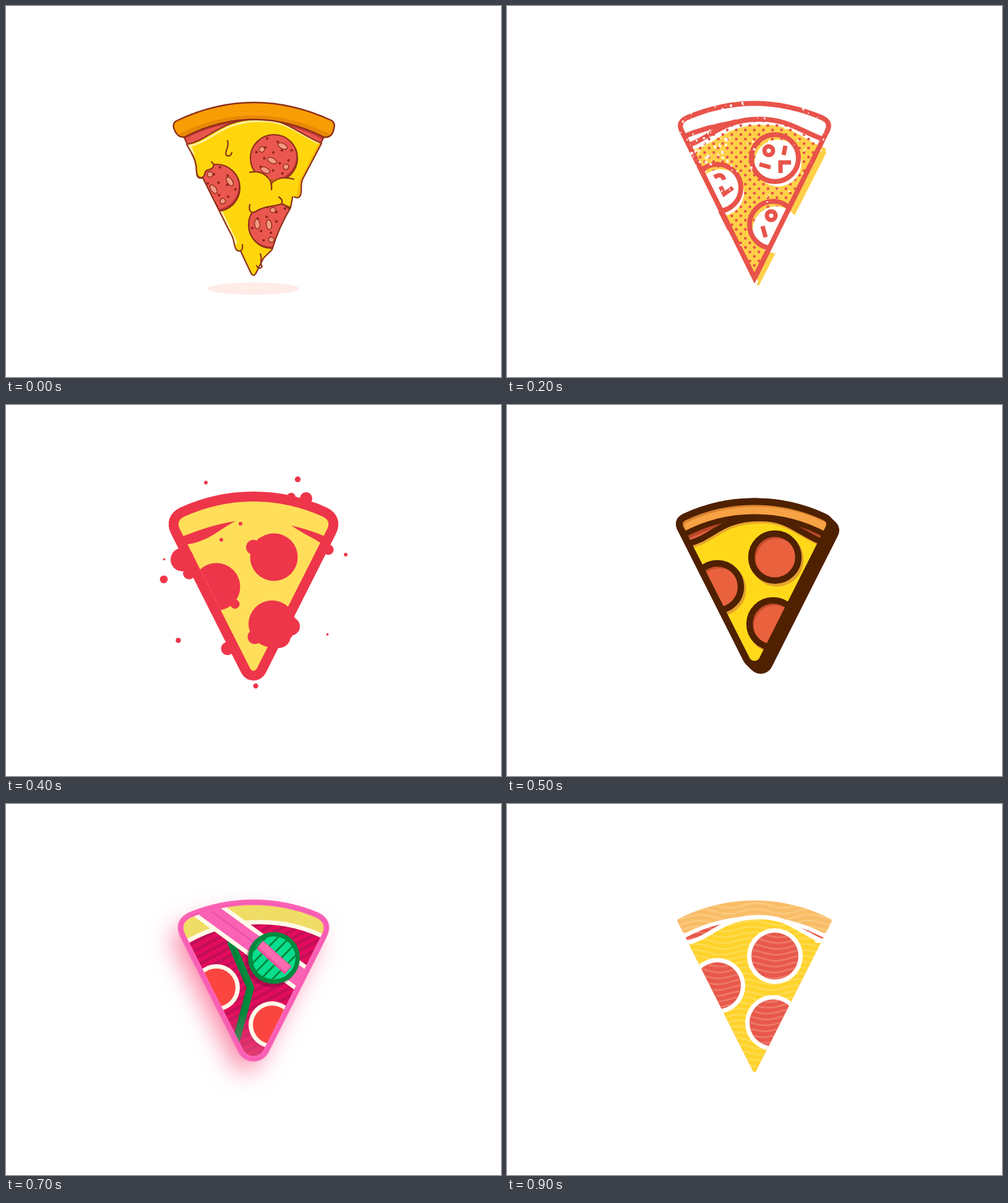
These frames come from a looping animation (800 px wide and 600 px high, 1 s). An HTML page with a canvas:

```html
<!DOCTYPE html>
<html lang="en">
<head>
<meta charset="utf-8">
<title>Pizza slices</title>
<style>
html, body { margin: 0; width: 100%; height: 100%; overflow: hidden; background: #fff; }
canvas { display: block; }
</style>
</head>
<body>
<canvas id="stage" width="800" height="600"></canvas>
<script>
const ctx = document.getElementById('stage').getContext('2d');
const TAU = Math.PI * 2;
const path = d => new Path2D(d);
const fill = (p, color) => { ctx.fillStyle = color; ctx.fill(p); };
const line = (p, color, width) => { ctx.strokeStyle = color; ctx.lineWidth = width; ctx.stroke(p); };

function oval(x, y, rx, ry, turn = 0) {
  const p = new Path2D();
  p.ellipse(x, y, rx, ry, turn, 0, TAU);
  return p;
}
const circle = (x, y, r) => oval(x, y, r, r);
const dot = (x, y, r, color) => fill(circle(x, y, r), color);

function within(p, draw) {
  ctx.save();
  ctx.clip(p);
  draw();
  ctx.restore();
}

function shifted(x, y, draw) {
  ctx.save();
  ctx.translate(x, y);
  draw();
  ctx.restore();
}

function seeded(seed) {
  return () => {
    seed = (seed * 16807) % 2147483647;
    return seed / 2147483647;
  };
}

// Shared slice geometry: a sector whose top arc is centred on HUB.
const HUB = 424, R = 268, SPREAD = Math.atan2(126, 237);

function wedge(corner, tipRadius) {
  const a = SPREAD - corner / R;
  const cx = 126 - 0.45 * corner, cy = 187 + 0.893 * corner;
  const p = new Path2D();
  p.moveTo(400 - cx, cy);
  p.quadraticCurveTo(274, 187, 400 - R * Math.sin(a), HUB - R * Math.cos(a));
  p.arc(400, HUB, R, -Math.PI / 2 - a, -Math.PI / 2 + a);
  p.quadraticCurveTo(526, 187, 400 + cx, cy);
  p.arcTo(400, 437, 400 - cx, cy, tipRadius);
  p.closePath();
  return p;
}
const discs = [[433, 246], [340, 294], [430, 354]];
const topCurve = 'M292 224C330 217 345 183 408 183C455 183 465 203 510 222';
const cheeseTop = path(topCurve);
const cheese = path(topCurve + 'L400 437Z');
const crustLow = path('M285 210A242 242 0 0 1 515 210');
const crust = path(`M280 184A268 268 0 0 1 520 184Q527 187 524 193L518 205Q515 210 510 208
  A242 242 0 0 0 290 208Q285 210 282 205L276 193Q273 187 280 184Z`);
const sharp = wedge(0, 0);

function specks(count, seed, color, place, size) {
  const rnd = seeded(seed);
  ctx.fillStyle = color;
  for (let i = 0; i < count; i++) {
    const [x, y] = place(rnd);
    const s = 0.6 + rnd() ** 3 * size;
    ctx.fillRect(x, y, s, s * (0.6 + rnd() * 0.8));
  }
}
const box = (x, y, w, h) => rnd => [x + rnd() * w, y + rnd() * h];

function salami(x, y, ink, turn) {
  const disc = circle(x, y, 38);
  fill(disc, '#bf3534');
  within(disc, () => dot(x - 2, y - 3, 38, '#ea574e'));
  for (let i = 1; i < 15; i++) {
    const r = 9 * Math.sqrt(i);
    dot(x + r * Math.cos(i * 2.4 + turn), y + r * Math.sin(i * 2.4 + turn), 2.1, '#8f2520');
  }
  for (let i = 0; i < 5; i++) {
    const a = turn + i * 1.57, r = i < 4 ? 24 : 5;
    const round = i % 2;
    const o = oval(x + r * Math.cos(a), y + r * Math.sin(a), round ? 4.5 : 8, 4.3, a + 1.4);
    fill(o, '#f49a84');
    line(o, ink, 1.4);
  }
  line(disc, ink, 2.2);
}

function melted() {
  const ink = '#8c2f1a', gold = '#ffd60c';
  const outline = d => line(path(d), ink, 2.2);
  fill(oval(400, 457, 74, 10), '#ffece7');

  const sauce = path('M286 208Q400 150 516 208L508 223L400 240L294 226Z');
  fill(sauce, '#e8564d');
  within(sauce, () => line(crustLow, '#c23b39', 13));
  line(sauce, ink, 2.2);

  const body = path(topCurve + `L480 279C475 288 479 298 476 306C473 312 466 311 464 305L460 326
    Q440 360 430 394L416 408L405 430Q400 441 395 430L379 396C371 398 370 390 368 381
    C367 372 362 367 358 358L318 278C311 280 308 276 308 268C308 255 305 248 300 238Z`);
  fill(body, gold);
  within(body, () => {
    shifted(3, 3, () => line(cheeseTop, '#fff0a0', 3));
    line(path('M296 226L312 270M345 330L370 382'), '#fff0a0', 7);
    line(path('M512 220L478 285L474 310'), '#f9b90c', 9);
    discs.forEach(([x, y], i) => salami(x, y, ink, 2.2 + i * 0.5));
  });
  line(body, ink, 2.2);

  const drip = 'C309 280 319 280 321 272C322 262 331 267 335 260Q337 256 332 252';
  fill(path('M302 242L308 268' + drip + 'L314 240Z'), gold);
  outline('M300 238C305 248 308 255 308 268' + drip);
  fill(path('M394 269C420 266 429 280 429 284Q440 274 466 280L466 308L425 308L396 290Z'), gold);
  outline('M394 269C414 265 432 278 429 297M428 288Q440 273 465 280');
  const fold = 'M394 321C391 335 399 336 406 331C420 322 438 324 445 320Q449 314 441 309';
  fill(path(fold + 'L410 306Z'), gold);
  outline(fold + 'M445 320L460 326');
  outline('M358 218C362 228 351 237 357 242Q363 244 365 237');
  outline('M411 401C415 410 409 416 414 421Q410 428 405 420M379 396Q383 394 382 386');

  const rim = path(`M277 185Q400 127 526 185Q533 190 530 198Q527 214 514 212
    Q400 155 288 212Q276 213 271 197Q269 188 277 185Z`);
  fill(rim, '#f89d04');
  within(rim, () => line(path('M282 209Q400 151 520 209'), '#e98805', 6));
  line(rim, ink, 2.4);
}

function stamped() {
  const red = '#e8534a';
  shifted(6, 9, () => {
    fill(cheese, '#ffd047');
    line(path('M508 228L400 441'), '#ffd047', 4);
  });
  within(cheese, () => {
    for (let j = 0; j < 38; j++) {
      for (let i = 0; i < 18; i++) dot(283 + i * 14.6 + (j % 2) * 7.3, 186 + j * 7.3, 2.3, red);
    }
  });
  discs.forEach(([x, y]) => dot(x + 5, y + 8, 38, '#fff'));

  ctx.lineCap = 'butt';
  ctx.lineJoin = 'miter';
  line(path(`M400 440L282 201Q276 188 290 181Q400 134 510 181Q524 188 518 201Z
    M286 211C320 196 345 194 371 187`), red, 8);
  line(path('M292 226C330 212 350 183 408 183C455 183 475 203 512 216'), red, 8);
  within(sharp, () => discs.forEach(([x, y]) => line(circle(x, y, 38), red, 8)));
  line(path('M424 391L400 440M345 331L360 361'), red, 8);
  line(circle(423, 234, 7), red, 7);
  line(circle(427, 339, 7), red, 7);
  line(path(`M450 226L447 241M408 256L426 261M442 270L442 253L459 253
    M335 277Q347 269 351 281M345 292L351 304L365 294M413 356L418 374`), red, 7);
  specks(260, 17, '#fff', r => [280 + r() * 240, 154 + r() * r() * 250], 3.2);
  specks(70, 5, '#fff', box(290, 210, 75, 60), 4);
}

function printed() {
  const slate = '#4a5961';
  const rnd = seeded(41);
  const bump = (x, y) => dot(x, y, 28 + rnd() * 9, slate);
  fill(sharp, slate);
  for (let t = 0; t <= 1; t += 0.045) {
    const a = SPREAD * (2 * t - 1);
    bump(400 + R * Math.sin(a), HUB - R * Math.cos(a));
    bump(274 + 126 * t, 187 + 250 * t);
    bump(526 - 126 * t, 187 + 250 * t);
  }
  specks(1300, 23, '#d5d9da', box(250, 130, 300, 335), 1.6);
  specks(650, 31, '#f2f3f3', box(375, 185, 145, 110), 1.9);
  specks(1000, 9, '#d2d2d4', r => {
    const a = r() * TAU, d = 235 * Math.sqrt(r());
    return [400 + d * Math.cos(a), 281 + d * Math.sin(a)];
  }, 2.4);
  specks(70, 12, '#c6c8ca', box(402, 68, 34, 55), 2.4);

  line(path(`M311 172Q405 142 513 181Q527 186 522 198L434 373M286 182Q274 186 281 197L355 353
    M368 376L374 387M382 404L396 430Q400 436 406 428L424 392M432 316A38 38 0 0 0 420 391
    M457 214A38 38 0 1 0 412 277M466 226A38 38 0 0 1 434 284
    M320 262Q330 256 345 256M352 258A38 38 0 0 1 362 324
    M298 221C330 212 350 183 408 183C455 183 470 202 504 210`), '#fff', 11);
  line(path('M292 210L342 193'), '#fff', 9);
  specks(45, 77, slate, box(290, 155, 220, 80), 1.8);
}

function splashed() {
  const red = '#ee364a';
  const inner = wedge(16, 6);
  line(inner, red, 32);
  fill(inner, '#ffde5a');
  fill(path('M284 213C310 203 340 192 371 188C345 200 328 222 288 226Z'), red);
  fill(path('M461 195C480 199 505 207 518 214L510 224C495 214 480 208 461 195Z'), red);
  within(sharp, () => dot(340, 294, 38.5, red));
  dot(433, 246, 38.5, red);
  dot(430, 354, 38, red);
  const blobs = [[285, 250, 19], [441, 374, 19], [460, 358, 15], [400, 230, 12], [402, 375, 11.5],
    [358, 394, 10.5], [485, 151, 10], [296, 272, 10], [521, 234, 8.5], [370, 322, 7.5], [461, 149, 7], [255, 282, 6.3]];
  blobs.forEach(([x, y, r]) => dot(x, y, r, red));
  // Fine droplets thrown out around the slice
  for (let i = 0; i < 7; i++) {
    const a = -1.15 + i * 0.9, d = 160 + 15 * Math.cos(i * 2);
    dot(400 + d * Math.cos(a), 280 + d * Math.sin(a), 3.2 + 1.5 * Math.cos(i * 1.8), red);
  }
  for (let i = 0; i < 3; i++) dot(348 + i * 31, 218 - 26 * (i % 2), 3, red);
}

function bold(depth) {
  const ink = '#4f2100';
  const slice = wedge(15, 14.5);
  for (let i = depth; i >= 0; i--) {
    shifted(i, i, () => { fill(slice, ink); line(slice, ink, 11); });
  }
  within(slice, () => {
    fill(slice, '#e4623f');
    fill(crust, '#f7a244');
    shifted(3, 3, () => line(slice, '#da8530', 11));
    shifted(2, 4, () => line(crustLow, '#b8472b', 10));
    fill(cheese, '#ffd919');
    within(cheese, () => {
      shifted(2, 3, () => line(cheeseTop, '#e9a62b', 11));
      discs.forEach(([x, y]) => line(circle(x + 3, y + 4, 38), '#e5a12d', 11));
    });
    discs.forEach(([x, y]) => {
      const disc = circle(x, y, 38);
      fill(disc, '#c24b2c');
      within(disc, () => dot(x + 3, y + 4, 34, '#e9623d'));
      line(disc, ink, 10.5);
    });
    line(crustLow, ink, 9);
    line(cheeseTop, ink, 10);
  });
  line(slice, ink, 11);
}

function hover() {
  const board = wedge(27, 23);
  const pink = '#fb62b6', cream = '#fffbea', green = '#00893d';
  shifted(0, 3, () => {
    ctx.save();
    ctx.shadowColor = 'rgba(244,50,105,.55)';
    ctx.shadowBlur = 38;
    ctx.shadowOffsetX = -13;
    ctx.shadowOffsetY = 20;
    fill(board, pink);
    ctx.restore();
    within(board, () => {
      fill(board, '#e20c5d');
      for (let y = 180; y < 560; y += 13) line(path(`M260 ${y}L540 ${y - 150}`), '#c20f57', 5);
      line(path('M364 222L395 294L372 380'), green, 12);
      line(path('M364 226L390 294L368 376'), '#057535', 2);
      const rimLow = 'M276 230A236 236 0 0 1 524 217';
      fill(path(rimLow + 'L540 150L260 150Z'), '#f0dd66');
      line(path(rimLow), cream, 7);
      const glow = ctx.createLinearGradient(0, 330, 0, 420);
      glow.addColorStop(0, 'rgba(240,110,140,0)');
      glow.addColorStop(1, 'rgba(240,110,140,.6)');
      fill(board, glow);
      fill(path('M303 174L348 162L488 264L469 297Z'), pink);
      line(path('M303 174L470 296M348 162L490 265'), cream, 7);
      line(path('M334 172L400 220'), '#e04ba4', 2);
      for (const [x, y] of discs.slice(1)) {
        dot(x, y, 38, cream);
        dot(x, y, 31, '#fb4640');
      }
    });
    line(board, pink, 9);
    shifted(1, 1, () => line(board, '#ee54ab', 1));
  });

  dot(429, 254, 42, 'rgba(70,0,45,.3)');
  dot(433, 249, 42, green);
  const hub = circle(433, 249, 35);
  within(hub, () => {
    fill(hub, '#08de8e');
    for (let x = 348; x < 500; x += 19) line(path(`M${x} 290L${x + 80} 208`), green, 3);
  });
  ctx.lineCap = 'butt';
  line(path('M411 228L456 269'), '#f0509f', 17);
  line(path('M411 226L456 267'), '#ff6bae', 12);
}

function waves(color) {
  for (let y = 145; y < 450; y += 9.5) {
    let d = '';
    for (let x = 265; x <= 535; x += 6) {
      d += `${d ? 'L' : 'M'}${x} ${y + 4 * Math.sin((x - 275) / 14 + y / 90)}`;
    }
    line(path(d), color, 3);
  }
}

function flat(wavy) {
  const paint = (shape, color, tint) => {
    fill(shape, color);
    if (wavy) within(shape, () => waves(tint));
  };
  within(wedge(4, 3), () => {
    paint(sharp, '#e7584b', '#ee7767');
    line(crustLow, '#fff', 14);
    line(crust, '#fff', 5);
    paint(crust, '#f9bd68', '#fbc97d');
    paint(cheese, '#ffd32c', '#ffdc50');
    line(cheeseTop, '#fff', 7);
    line(path('M284 223L300 223M500 222L518 222'), '#fff', 5);
    discs.forEach(([x, y]) => {
      dot(x, y, 45, '#fff');
      paint(circle(x, y, 38), '#e7584b', '#ee7767');
    });
  });
}

const scenes = [
  melted,
  () => flat(false),
  stamped,
  printed,
  splashed,
  () => bold(10),
  () => bold(0),
  hover,
  () => flat(false),
  () => flat(true)
];
const start = performance.now();
let shown = -1;

function tick() {
  const now = Math.floor((performance.now() - start) % 1000 / 100);
  if (now !== shown) {
    shown = now;
    ctx.fillStyle = '#fff';
    ctx.fillRect(0, 0, 800, 600);
    ctx.lineCap = ctx.lineJoin = 'round';
    scenes[now]();
  }
  requestAnimationFrame(tick);
}
tick();
</script>
</body>
</html>
```
